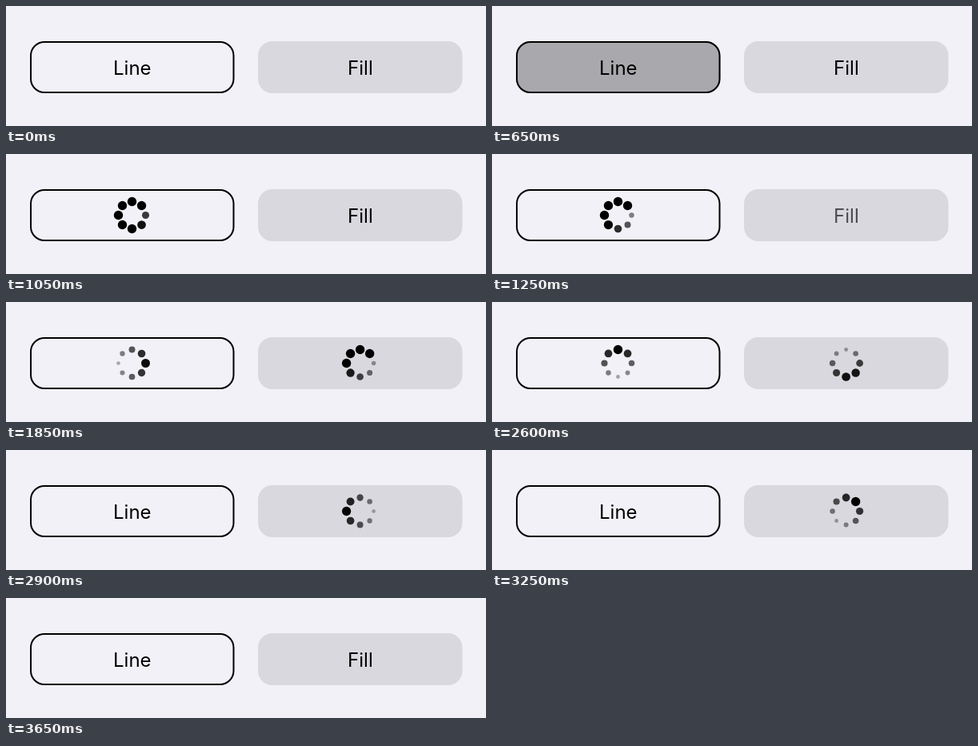
An HTML page that plays this animation: 600x150 px, repeating every 4 s.

```html
<!DOCTYPE html>
<html lang="en">
<head>
<meta charset="utf-8">
<title>Loading buttons</title>
<style>
  html, body { margin: 0; width: 100%; height: 100%; overflow: hidden; background: #f2f1f7; }
  svg { display: block; width: 600px; height: 150px; }
  text { font: 24px Inter, Roboto, sans-serif; text-anchor: middle; }
</style>
</head>
<body>
<svg viewBox="0 0 600 150"></svg>
<script>
const LOOP = 4000, STEP = 50, FADE = 200, SPIN_DELAY = 230;
const svg = document.querySelector('svg');
const clamp = v => Math.min(1, Math.max(0, v));

function add(parent, tag, attrs) {
  const el = document.createElementNS('http://www.w3.org/2000/svg', tag);
  for (const name in attrs) el.setAttribute(name, attrs[name]);
  return parent.appendChild(el);
}

function makeButton({ x, cx, label, fill, outline, press, release, stop }) {
  const box = { x, y: 44, width: 255.5, height: 65, rx: 18 };
  const edge = { x: x + 1, y: 45, width: 253.5, height: 63, rx: 17 };
  add(svg, 'rect', { ...box, fill });
  const shade = add(svg, 'rect', { ...box, fill: '#000' });
  if (outline) add(svg, 'rect', { ...edge, fill: 'none', stroke: '#000', 'stroke-width': 2 });
  const text = add(svg, 'text', { x: cx + 0.3, y: 85.5 });
  text.textContent = label;
  const spinner = add(svg, 'g', {});
  const dots = Array.from({ length: 8 }, (_, i) => add(spinner, 'circle', {
    cx: cx + 17 * Math.cos(i * Math.PI / 4),
    cy: 76.5 + 17 * Math.sin(i * Math.PI / 4)
  }));

  return t => {
    const start = release + SPIN_DELAY;
    shade.setAttribute('opacity', t >= press && t < press + STEP ? 0.3 : 0);
    text.setAttribute('opacity', clamp(1 - (t - release) / FADE) + clamp((t - stop) / FADE));
    spinner.setAttribute('visibility', t >= start && t < stop ? 'visible' : 'hidden');
    // Each dot dips in size and opacity once a second, 120 ms after the one before.
    dots.forEach((dot, i) => {
      const phase = Math.max(0, (t - start - i * 120) / 1000) % 1;
      const dip = 1 - Math.abs(2 * phase - 1);
      dot.setAttribute('r', 5.7 * (1 - 0.6 * dip));
      dot.setAttribute('opacity', 1 - 0.7 * dip);
    });
  };
}

const buttons = [
  { x: 30, cx: 157.5, label: 'Line', fill: '#f2f1f7', outline: true, press: 650, release: 650, stop: 2650 },
  { x: 315, cx: 442.6, label: 'Fill', fill: '#d9d8de', press: 1150, release: 1180, stop: 3450 }
].map(makeButton);

function draw() {
  const t = Math.floor(performance.now() % LOOP / STEP) * STEP;
  buttons.forEach(update => update(t));
  requestAnimationFrame(draw);
}
draw();
</script>
</body>
</html>
```
